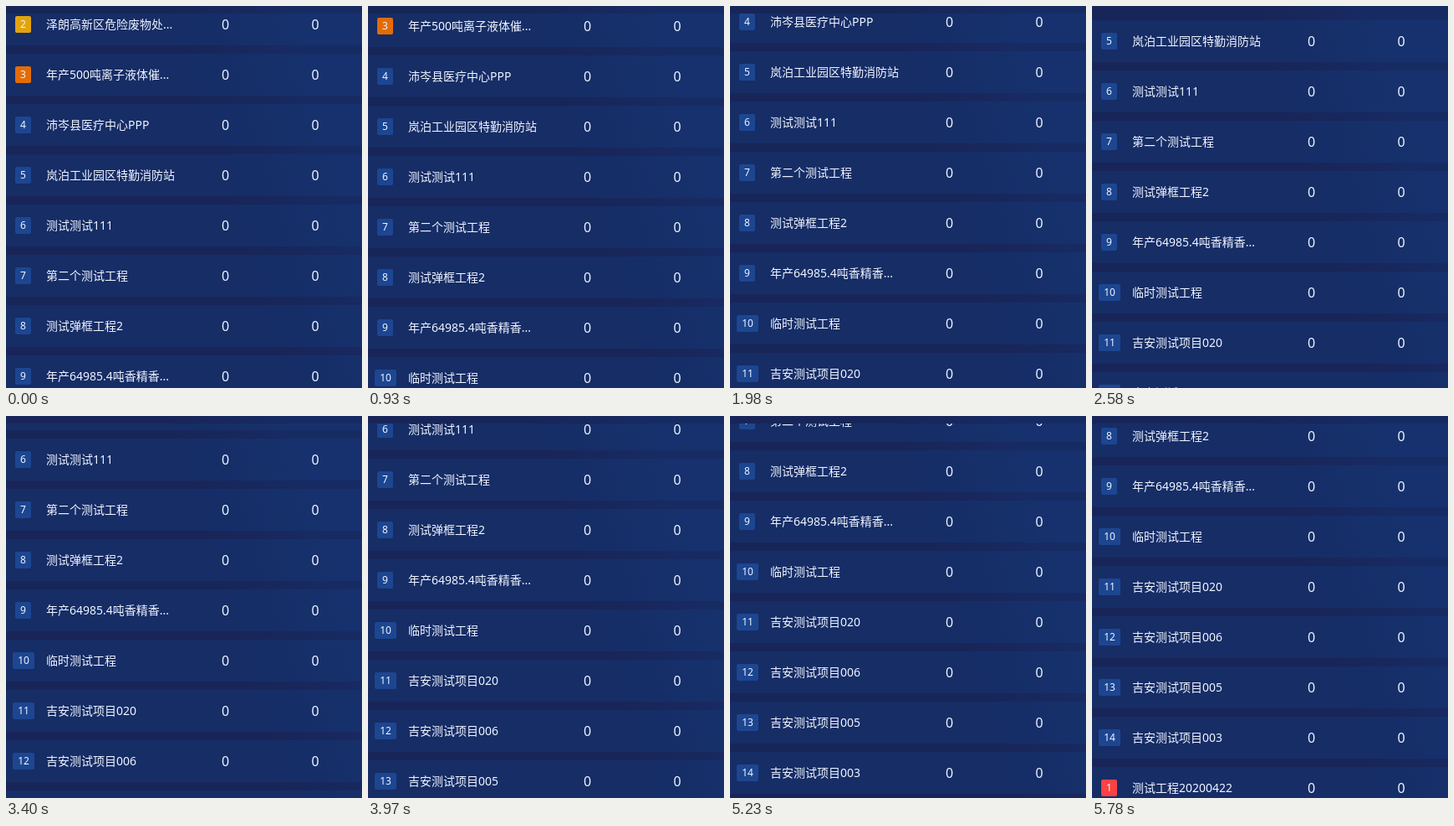
An HTML page with a canvas that plays this animation: 426x456 px, repeating every 5880 ms.

```html
<!DOCTYPE html>
<html lang="zh-CN">
<head>
<meta charset="utf-8">
<style>
  html, body { margin: 0; height: 100%; overflow: hidden; background: #182558; }
  canvas { display: block; }
</style>
</head>
<body>
<canvas id="stage" width="426" height="456"></canvas>
<script>
const ctx = document.getElementById('stage').getContext('2d');
const FONT = '"Noto Sans", "Noto Sans CJK SC", "Noto Sans CJK", sans-serif';
const LOOP = 5880, SPEED = 0.0619, PITCH = 60, ROW_HEIGHT = 50, CLIP_TOP = 9;

const names = [
  '测试工程20200422', '泽朗高新区危险废物处...', '年产500吨离子液体催...',
  '沛岑县医疗中心PPP', '岚泊工业园区特勤消防站', '测试测试111',
  '第二个测试工程', '测试弹框工程2', '年产64985.4吨香精香...', '临时测试工程',
  '吉安测试项目020', '吉安测试项目006', '吉安测试项目005', '吉安测试项目003'
];
const rankColors = ['#fd4144', '#e2a40e', '#e36c06'];

// The list advances in small jumps: [start, end, number of jumps].
const spans = [
  [0, 120, 1], [120, 930, 6], [930, 1230, 2], [1230, 1980, 6], [1980, 2280, 2],
  [2280, 2580, 2], [2580, 2720, 1], [2720, 3260, 4], [3260, 3400, 1],
  [3400, 3550, 1], [3550, 4390, 6], [4390, 4840, 3], [4840, 5510, 5],
  [5510, 5660, 1], [5660, 5780, 1], [5780, LOOP, 1]
];

function lastJump(time) {
  const [start, end, count] = spans.find(span => time < span[1]);
  const step = (end - start) / count;
  return start + Math.floor((time - start) / step) * step;
}

const backdrop = ctx.createLinearGradient(180, -50, 312, -91);
backdrop.addColorStop(0, '#182558');
backdrop.addColorStop(1, '#172b63');

function text(value, x, y, size, align = 'center', weight = 400) {
  ctx.font = `${weight} ${size}px ${FONT}`;
  ctx.textAlign = align;
  ctx.fillStyle = '#f0f5ff';
  ctx.fillText(value, x, y + Math.round(size * 0.36));
}

function drawRow(index, y) {
  const rank = index % names.length;
  ctx.fillStyle = 'rgba(22, 58, 122, 0.4)';
  ctx.fillRect(0, y - ROW_HEIGHT / 2, 426, ROW_HEIGHT);

  const [left, width] = rank < 9 ? [11, 19] : [8, 26];
  ctx.fillStyle = rankColors[rank] || '#1d4691';
  ctx.beginPath();
  ctx.roundRect(left, y - 10, width, 20, 2);
  ctx.fill();

  text(rank + 1, left + width / 2, y, 12, 'center', 500);
  text(names[rank], 48, y, 14, 'left');
  text(0, 262.5, y, 16);
  text(0, 370, y, 16);
}

function draw(now) {
  const scroll = Math.round(lastJump(now % LOOP) * SPEED);
  ctx.fillStyle = backdrop;
  ctx.fillRect(0, 0, 426, 456);
  ctx.save();
  ctx.beginPath();
  ctx.rect(0, CLIP_TOP, 426, 456 - CLIP_TOP);
  ctx.clip();
  for (let i = 0; i <= names.length + 1; i++) {
    const y = PITCH * i - 38 - scroll;
    if (y > -30 && y < 490) drawRow(i, y);
  }
  ctx.restore();
}

const began = performance.now();
function tick() {
  draw(performance.now() - began);
  requestAnimationFrame(tick);
}
tick();
</script>
</body>
</html>
```
